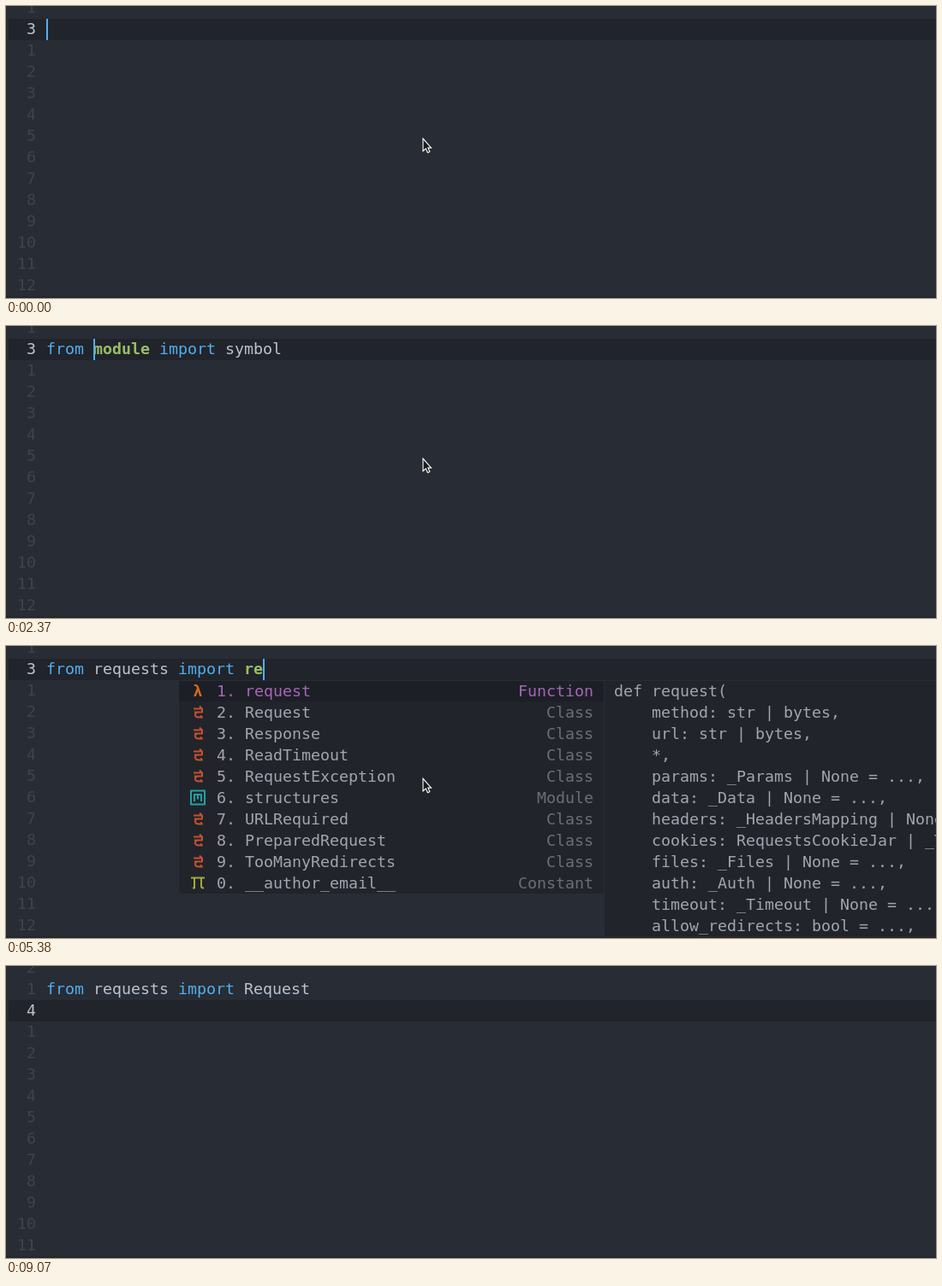
Recreate the animation shown at these times as an HTML page with a canvas. Size 1086x342 px, loop 9.11 s.

```html
<!DOCTYPE html>
<html lang="en">
<head>
<meta charset="utf-8">
<title>Code completion</title>
<style>
  html, body { margin: 0; width: 100%; height: 100%; overflow: hidden; background: #282c34; }
  canvas { display: block; }
</style>
</head>
<body>
<canvas id="stage" width="1086" height="342"></canvas>
<script>
const ctx = document.getElementById('stage').getContext('2d');
const LOOP = 9110, CHAR = 11, ROW = 25, LEFT = 47, TOP = 15;
const FACE = '18.271px "DejaVu Sans Mono", monospace';
const COLOR = {
  back: '#282c34', line: '#21242b', number: '#3f444a', text: '#bbc2cf',
  keyword: '#51afef', field: '#98be65', panel: 'rgba(33,36,43,.95)', edge: '#282c34',
  chosen: '#1c1f25', chosenText: '#a566b8', item: '#a0a5af', note: '#6a6f77', link: '#4695cd'
};
const KINDS = { C: 'Class', K: 'Keyword', F: 'Function', M: 'Module', P: 'Constant', S: 'Snippet' };

// Each item starts with the letter of its kind.
const makeList = (x, columns, items) => ({ x, columns, items: items.split(' ') });
const lists = {
  fro: makeList(71, 31, 'Cfrozenset Kfor Kfrom KFalse Kfinally Cfloat Cfilter Fformat Cfunction CFutureWarning'),
  from: makeList(71, 31, 'Kfrom Sfrom'),
  requ: makeList(103, 36, 'Mrequests Mrequests_file Mrequests_oauthlib Mrequests_toolbelt'),
  re: makeList(279, 37, 'Frequest CRequest CResponse CReadTimeout CRequestException Mstructures CURLRequired CPreparedRequest CTooManyRedirects P__author_email__'),
  req: makeList(279, 37, 'Frequest CRequest CRequestException CPreparedRequest CURLRequired')
};

const docs = {
  frozenset: `class frozenset()

frozenset() -> empty frozenset object
frozenset(iterable) -> frozenset object

Build an immutable unordered collection of unique elements.`,
  snippet: 'from module import symbol',
  requests: `Requests HTTP Library


Requests is an HTTP library, written in Python, for human beings.
Basic GET usage:

   ▌>> import requests
   ▌>> r = requests.get('https://www.python.org')
   ▌>> r.status_code
   200
   ▌>> b'Python is a programming language' in r.content
   True`,
  request: `def request(
    method: str | bytes,
    url: str | bytes,
    *,
    params: _Params | None = ...,
    data: _Data | None = ...,
    headers: _HeadersMapping | None = ...,
    cookies: RequestsCookieJar | _TextMapping | None = ...,
    files: _Files | None = ...,
    auth: _Auth | None = ...,
    timeout: _Timeout | None = ...,
    allow_redirects: bool = ...,`,
  Request: `class Request(
    method: str | bytes | None = None,
    url: str | bytes | None = None,
    headers: _HeadersMapping | None = None,
    files: _Files | None = None,
    data: _Data | None = None,
    params: _Params | None = None,
    auth: _Auth | None = None,
    cookies: RequestsCookieJar | None = None,
    hooks: _Hooks | None = None,
    json: Any | None = None
)`
};

// Time, code (~keyword~, *field*), cursor column (-1 hides it), list, selected item, documentation.
const steps = [
  [0, '', 0],
  [420, '', -1],
  [780, 'f', 1],
  [910, 'fr', 2],
  [980, 'fr', 2, 'fro', 0, 'frozenset'],
  [1070, 'fro', 3, 'fro', 0, 'frozenset'],
  [1220, 'from', 4, 'fro', 0, 'frozenset'],
  [1360, '~from~', 4, 'from', 0],
  [1600, '~from~', 4, 'from', 1, 'snippet'],
  [1770, '~from~', -1, 'from', 1, 'snippet'],
  [2250, '~from~', 4],
  [2370, '~from~ *module* ~import~ symbol', 5],
  [2900, '~from~ *module* ~import~ symbol', -1],
  [3380, '~from~ *r* ~import~ symbol', 6],
  [3500, '~from~ *re* ~import~ symbol', 7],
  [3680, '~from~ *req* ~import~ symbol', 8],
  [3740, '~from~ *req* ~import~ symbol', 8, 'requ', 0, 'requests'],
  [3840, '~from~ *requ* ~import~ symbol', 9, 'requ', 0, 'requests'],
  [4370, '~from~ *requests* ~import~ symbol', 13],
  [4790, '~from~ requests ~import~ *symbol*', 21],
  [5150, '~from~ requests ~import~ *r*', 22],
  [5260, '~from~ requests ~import~ *re*', 23],
  [5380, '~from~ requests ~import~ *re*', 23, 're', 0, 'request'],
  [5500, '~from~ requests ~import~ *req*', 24, 're', 0, 'request'],
  [5610, '~from~ requests ~import~ *req*', 24, 'req', 0, 'request'],
  [6150, '~from~ requests ~import~ *Request*', 28, 'req', 1, 'request'],
  [6210, '~from~ requests ~import~ *Request*', 28, 'req', 1, 'Request'],
  [6440, '~from~ requests ~import~ *Request*', 28],
  [6980, '~from~ requests ~import~ Request', 0],
  [7460, '~from~ requests ~import~ Request', -1],
  [7630, '~from~ requests ~import~ Request', 0],
  [8130, '~from~ requests ~import~ Request', -1],
  [8640, '~from~ requests ~import~ Request', 0],
  [9070, '~from~ requests ~import~ Request', -1]
];

// Icon strokes around a centre at 0,0.
const CLASS_ICON = new Path2D('M-5 -4H5L2 -7M5 -4V0H-4M0 0Q-4 1 -3 4Q-2 6 1 6H5L3 4');
const CONSTANT_ICON = new Path2D('M-8 -6H8M-4 -6V6H-6M4 -6V4Q4 6 7 6');
const BOX = new Path2D('M-8 -8H8V8H-8Z');
const MODULE_ICON = new Path2D('M-4 4.5V-3.5H4V4.5M0 -3.5V2');
const KEYWORD_ICON = new Path2D('M-2.5 -5V5M3.5 -5L-1.5 0L3.5 5');

function rect(x, y, w, h, color) {
  ctx.fillStyle = color;
  ctx.fillRect(x, y, w, h);
}

function text(string, x, baseline, color, style = '', align = 'left') {
  ctx.font = style + ' ' + FACE;
  ctx.textAlign = align;
  ctx.fillStyle = color;
  ctx.fillText(string, x, baseline);
}

function drawCode(code, baseline) {
  let x = LEFT;
  for (const part of code.split(/(~\w+~|\*\w+\*)/)) {
    const mark = part[0];
    const plain = part.replace(/[~*]/g, '');
    const color = mark === '~' ? COLOR.keyword : mark === '*' ? COLOR.field : COLOR.text;
    text(plain, x, baseline, color, mark === '*' ? 'bold' : '');
    x += plain.length * CHAR;
  }
}

function drawBuffer(code, column, current) {
  rect(0, 0, 1086, 342, COLOR.back);
  rect(3, TOP + current * ROW, 1083, ROW, COLOR.line);
  for (let row = -1; row < 13; row++) {
    const here = row === current;
    const number = here ? current + 3 : Math.abs(row - current);
    text(number, 35, TOP + row * ROW + 18, here ? COLOR.text : COLOR.number, '', 'right');
  }
  drawCode(code, TOP + 18);
  if (column >= 0) rect(LEFT + column * CHAR, TOP + current * ROW, 2, ROW, COLOR.keyword);
  rect(0, 340, 1086, 2, '#23262d');
}

function drawStrokes(x, y, color, ...paths) {
  ctx.save();
  ctx.translate(x, y);
  ctx.strokeStyle = color;
  ctx.lineWidth = 2;
  ctx.lineJoin = 'round';
  paths.forEach(path => ctx.stroke(path));
  ctx.restore();
}

function drawIcon(kind, x, y) {
  if (kind === 'K') drawStrokes(x, y, '#217fb2', BOX, KEYWORD_ICON);
  else if (kind === 'M') drawStrokes(x, y, '#20a3a3', BOX, MODULE_ICON);
  else if (kind === 'S') drawStrokes(x, y, '#7f9d59', BOX);
  else if (kind === 'F') text('λ', x, y + 6, '#d4681f', 'bold', 'center');
  else if (kind === 'P') drawStrokes(x, y, '#a7aa35', CONSTANT_ICON);
  else drawStrokes(x, y, '#c4502f', CLASS_ICON);
}

function drawDoc(name, x) {
  const lines = docs[name].split('\n');
  const height = lines.length * ROW;
  rect(x, 40, 1086 - x, height + 1, COLOR.panel);
  rect(x, 40, 1086 - x, 1, COLOR.edge);
  rect(x, 40 + height, 1086 - x, 1, COLOR.edge);
  lines.forEach((line, i) => {
    const y = 40 + i * ROW, left = x + 11;
    if (!line.includes('▌')) return text(line, left, y + 19, COLOR.item);
    rect(left + 3 * CHAR, y + 1, 5, ROW - 1, COLOR.note);
    const code = line.slice(4);
    const split = code.includes('https') ? code.indexOf("'") : code.length;
    text(code.slice(0, split), left + 4 * CHAR, y + 19, COLOR.note, 'italic');
    text(code.slice(split), left + (4 + split) * CHAR, y + 19, COLOR.link, 'italic');
  });
}

function drawList({ x, columns, items }, selected, doc) {
  const left = x - 77, noteRight = x + columns * CHAR, right = noteRight + 12;
  const height = items.length * ROW;
  rect(left, 40, right - left, height + 1, COLOR.panel);
  rect(left, 40 + selected * ROW, right - left, ROW, COLOR.chosen);
  rect(left, 40, right - left, 1, COLOR.edge);
  rect(left, 40 + height, right - left, 1, COLOR.edge);
  items.forEach((item, i) => {
    const y = 40 + i * ROW, chosen = i === selected;
    const color = chosen ? COLOR.chosenText : COLOR.item;
    drawIcon(item[0], x - 55, y + 12.5);
    text(`${(i + 1) % 10}. ${item.slice(1)}`, x - 33, y + 19, color);
    text(KINDS[item[0]], noteRight, y + 19, chosen ? color : COLOR.note, '', 'right');
  });
  if (doc) drawDoc(doc, right + 1);
  rect(right, 40, 1, doc ? Math.max(height, docs[doc].split('\n').length * ROW) : height, COLOR.edge);
}

function drawPointer(t) {
  if (t >= 8410) return;
  const moved = t < 7930 ? 0 : (Math.floor((t - 7930) / 69) + 1) / 7;
  const ease = moved * moved * (3 - 2 * moved);
  ctx.save();
  ctx.translate(487 + 433 * ease, 154.5 + 157 * ease ** 1.35);
  const arrow = new Path2D('M0 .8V15.4L3.2 12.4L5.4 17.2L7.8 16.2L5.8 11.6H9.5Z');
  ctx.fillStyle = '#17191d';
  ctx.strokeStyle = '#fff';
  ctx.lineWidth = 1.1;
  ctx.fill(arrow);
  ctx.stroke(arrow);
  ctx.restore();
}

function frame(now) {
  const t = now % LOOP;
  const [, code, column, list, selected, doc] = steps.findLast(step => step[0] <= t);
  drawBuffer(code, column, t < 6980 ? 0 : 1);
  if (list) drawList(lists[list], selected, doc);
  drawPointer(t);
  requestAnimationFrame(() => frame(performance.now() - start));
}

const start = performance.now();
frame(0);
</script>
</body>
</html>
```
